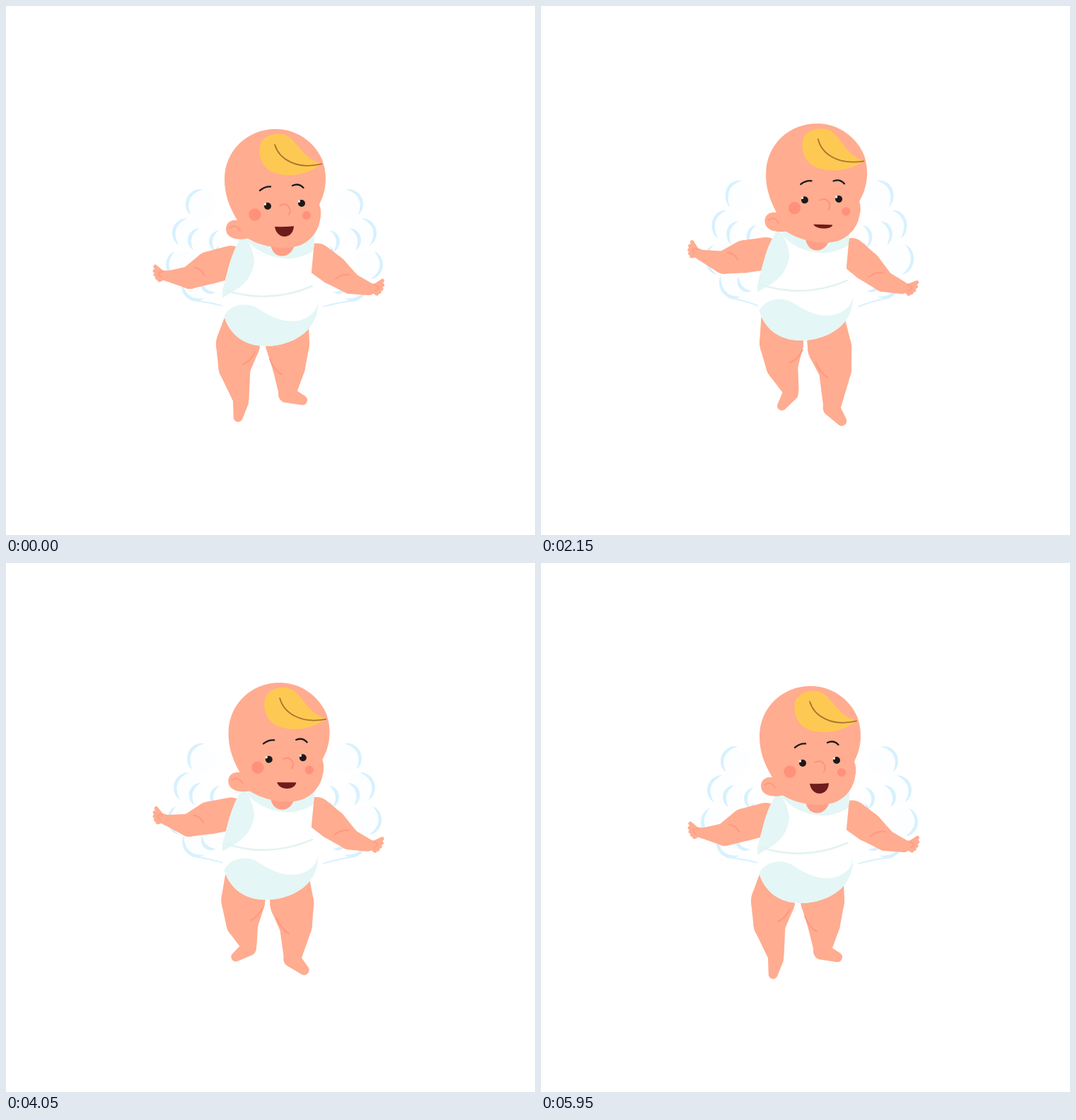
These frames come from a looping animation (748x748 px, 6 s). An HTML page with a canvas:

```html
<!DOCTYPE html>
<html lang="en">
<head>
<meta charset="utf-8">
<title>Baby angel</title>
<style>
html, body { margin: 0; width: 100%; height: 100%; overflow: hidden; background: #fff; }
canvas { display: block; width: 748px; height: 748px; }
</style>
</head>
<body>
<canvas id="stage" width="748" height="748"></canvas>
<script>
const ctx = document.getElementById('stage').getContext('2d');
const SKIN = '#ffac90', FOLD = '#ff9880', BLUSH = '#ff917b', SHADE = '#e4f6f5', FEATHER = '#d7f1fe', INK = '#1c1919';
const LOOP = 6000, STEP = 50, RAD = Math.PI / 180;

const mix = (a, b, k) => a + (b - a) * k;
// 0 -> 1 -> 0 at constant speed
const swing = (t, period) => 1 - Math.abs((t % period) / (period / 2) - 1);
// A joint travels from one place to another and has a radius
const joint = (k, x0, y0, x1, y1, r) => [mix(x0, x1, k), mix(y0, y1, k), r];

// Value of [progress, x, y, degrees] keys at progress k
function keyed(keys, k) {
  let i = 0;
  while (i < keys.length - 2 && k > keys[i + 1][0]) i++;
  const a = keys[i], b = keys[i + 1], f = (k - a[0]) / (b[0] - a[0]);
  return [1, 2, 3].map(n => mix(a[n], b[n], f));
}

function fill(d, color) {
  ctx.fillStyle = color;
  ctx.fill(new Path2D(d));
}

function line(d, color, width) {
  ctx.strokeStyle = color;
  ctx.lineWidth = width;
  ctx.stroke(new Path2D(d));
}

function dot(x, y, r, color) {
  ctx.beginPath();
  ctx.arc(x, y, r, 0, Math.PI * 2);
  ctx.fillStyle = color;
  ctx.fill();
}

// Run drawing in a moved, turned frame
function placed(x, y, angle, flip, paint) {
  ctx.save();
  ctx.translate(x, y);
  ctx.scale(flip, 1);
  ctx.rotate(angle);
  paint();
  ctx.restore();
}

// Tapered skin through a chain of round joints
function limb(...joints) {
  ctx.fillStyle = SKIN;
  for (let i = 1; i < joints.length; i++) {
    const [x0, y0, r0] = joints[i - 1], [x1, y1, r1] = joints[i];
    const a = Math.atan2(y1 - y0, x1 - x0);
    const off = Math.acos((r0 - r1) / Math.hypot(x1 - x0, y1 - y0));
    ctx.beginPath();
    ctx.arc(x0, y0, r0, a + off, a - off + Math.PI * 2);
    ctx.arc(x1, y1, r1, a - off, a + off);
    ctx.fill();
  }
}

function fold([x, y], d) {
  placed(x, y, 0, 1, () => line(d, FOLD, 2));
}

// Arc that is thick in the middle, facing the given direction
function feather(x, y, r, degrees, width) {
  const half = 74 * RAD;
  placed(x, y, degrees * RAD, 1, () => {
    ctx.beginPath();
    ctx.arc(0, 0, r, -half, half);
    ctx.quadraticCurveTo(2 * (r - width) - r * Math.cos(half), 0, r * Math.cos(half), -r * Math.sin(half));
    ctx.fillStyle = FEATHER;
    ctx.fill();
  });
}

function wing(lift, flip) {
  const rim = [[484, 280], [503, 321], [512, 366], [490, 396]];
  const curls = [[485, 331], [456, 333], [450, 352], [470, 393]];
  placed(379.5 + flip * 68.5, 425, 0, flip, () => {
    ctx.transform(1 - .169 * lift, -.224 * lift, .086 * lift, 1 + .2 * lift, 0, 0);
    ctx.translate(-448, -425);
    rim.forEach(([x, y]) => dot(x, y, 21, '#fdfeff'));
    rim.forEach(([x, y], i) => feather(x, y, 21, 8.3 * i * i - 25, 4.5));
    curls.forEach(([x, y], i) => feather(x, y, 17 - i, 7 * i * i - 15, 5));
    line('M496 416 Q470 419 449 425', FEATHER, 1.8);
  });
}

function hand([x, y], angle, flip) {
  placed(x, y, angle * RAD, flip, () => {
    limb([0, 0, 7.5], [9, -1, 6.5]);
    for (let i = 0; i < 5; i++) {
      const a = (i - 2) * .27, len = 22.5 - 2.3 * i;
      limb([4, 0, 4], [len * Math.cos(a), len * Math.sin(a), 2.7]);
    }
    line('M8 -5 Q12 -6 14 -2 M9 2 Q13 1 14 -2', FOLD, 1.2);
  });
}

function arms(k) {
  const elbowL = joint(k, 260, 384, 258, 361, 16), wristL = joint(k, 229, 382, 226, 350, 7.5);
  const elbowR = joint(k, 487, 392, 484, 389, 15), wristR = joint(k, 513, 400, 510, 398, 9);
  limb(joint(k, 318, 362, 318, 349, 23), joint(k, 288, 370, 288, 353, 23), elbowL, wristL);
  limb(joint(k, 440, 357, 439, 349, 21.5), joint(k, 462, 373, 460, 367, 21), elbowR, wristR);
  hand(wristL, mix(-6, -26, k), -1);
  hand(wristR, mix(0, 13, k), 1);
  fold(elbowL, 'M6 -14 Q16 -13 20 -4');
  fold(elbowR, 'M-21 -6 Q-11 -14 -1 -12');
}

function foot([x, y, degrees], ankle, toe) {
  placed(x, y, degrees * RAD, 1, () => limb([0, 0, ankle], toe));
}

function legs(k) {
  const ankleL = keyed([[0, 332, 560, -50], [.21, 335, 557, -49], [.5, 341, 544, 0], [1, 355, 548, -30]], k);
  const ankleR = keyed([[0, 397, 549, -33], [.21, 408, 547, -44], [.5, 403, 558, -13], [1, 412, 570, 0]], k);
  const kneeL = joint(k, 323, 511, 342, 508, 22.5), kneeR = joint(k, 400, 510, 417, 515, 23);
  limb(joint(k, 335, 452, 340, 444, 28.5), joint(k, 328, 478, 341, 476, 31), kneeL, [ankleL[0], ankleL[1] - 5, 11.5]);
  limb(joint(k, 400, 454, 402, 446, 28), joint(k, 398, 477, 409, 484, 31), kneeR, [ankleR[0] + 1, ankleR[1] - 3, 12.5]);
  foot(ankleL, 11, [-19, 11, 6.5]);
  foot(ankleR, 12, [14, 19, 7]);
  fold(kneeL, 'M12 -4 Q23 -9 29 -22');
  fold(kneeR, 'M-27 -11 Q-21 5 -10 11');
}

function torso(k) {
  placed(0, -8.5 * k, 0, 1, () => {
    const suit = 'M333 326 Q322 344 316 365 L306 402 L306 425 Q307 437 309 441 C318 466 338 481 368 481 C400 481 443 462 441 418 L434 396 Q432 386 432 376 L436 333 L437 318Z';
    fill(suit, '#fff');
    ctx.clip(new Path2D(suit));
    fill('M333 320 Q350 340 351 362 Q348 387 324 402 L300 416 L300 320Z', SHADE);
    fill('M341 331 C355 349 380 358 405 357 Q424 354 440 343 V310 H341Z', SHADE);
    line('M311 402 Q372 422 433 396', '#e2f4ef', 2.6);
    fill('M308 440 C317 420 342 419 355 427 C374 439 394 450 417 444 Q440 436 441 417 L450 490 H300Z', SHADE);
    fill('M374 338 Q378 354 391 353.5 Q403 353 408 338Z', '#ff9e86');
  });
}

function face(k) {
  line('M359 261 Q366 255 374 255.5 M405 254 Q414 250 420.5 257', INK, 2.3);
  for (const [x, y] of [[370, 283], [418, 279]]) {
    dot(x - 4.5 * k, y, 5, INK);
    dot(x - 4.5 * k - 3.6, y - 2.8, 1.7, '#fff0ea');
  }
  line('M387 282 Q395 278 399 283 Q404 289 400 295', BLUSH, 1.9);
  dot(352, 295, 8.7, BLUSH);
  dot(425, 296, 6.1, BLUSH);

  // The mouth closes as the body rises
  const deep = 14.5 - 10 * k;
  placed(380, 312 + 5 * k, 0, 1, () =>
    fill(`M0 0 Q13 ${.5 - k} 27 -.7 C26 ${deep * 1.28} 3 ${deep * 1.32} 0 0Z`, '#6e1b1d'));
}

function head(k) {
  placed(390 + 4 * k, 345 - 8 * k, .058 * k, 1, () => {
    ctx.translate(-390, -345);
    fill('M340 308 C322 297 311 305 311 315 C311 327 324 333 345 328Z', SKIN);
    fill('M381 174 C416 174 439 198 447 217 C454 236 453 254 448 269 L443 281 Q447 290 444 303 C441 321 428 334 414 339 C390 346 358 340 338 326 L327 303 C315 283 309 266 309 245 C309 205 341 174 381 174Z', SKIN);
    line('M316 314 Q325 307 331 318', FOLD, 1.8);
    fill('M446 223 C421 216 413 194 400 185 C387 177 369 181 361 192 C354 207 361 228 377 235 C400 244 429 238 446 223Z', '#fec953');
    line('M380 196 C386 216 410 232 446 223.5', '#a9742f', 1.8);
    face(k);
  });
}

function draw(now) {
  const t = Math.floor((now % LOOP) / STEP) * STEP + STEP / 2;
  const k = (swing(t, 1500) - .033) / .934;
  const lift = swing(t, 1000) - .05;
  ctx.fillStyle = '#fff';
  ctx.fillRect(0, 0, 748, 748);
  ctx.lineCap = ctx.lineJoin = 'round';
  wing(lift, 1);
  wing(lift, -1);
  arms(k);
  legs(k);
  torso(k);
  head(k);
}

const start = performance.now();
function tick() {
  draw(performance.now() - start);
  requestAnimationFrame(tick);
}
tick();
</script>
</body>
</html>
```
